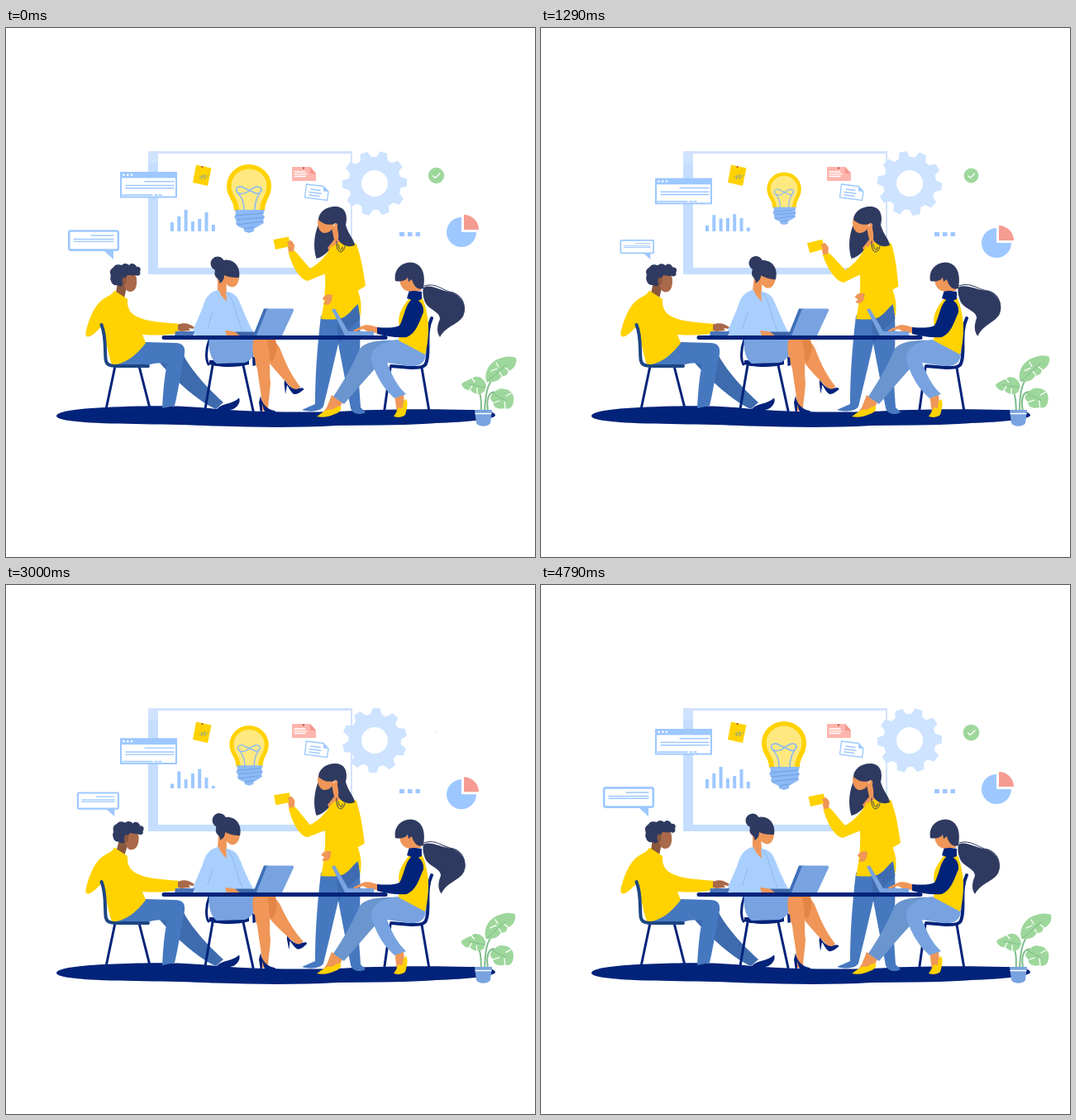
An HTML page for the animation above (4.87 s loop, 640 px wide and 640 px high).

```html
<!DOCTYPE html>
<html lang="en">
<head>
<meta charset="utf-8">
<title>Team meeting</title>
<style>
html, body { margin: 0; width: 100%; height: 100%; overflow: hidden; background: #fff; }
svg { display: block; width: 100vw; height: 100vh; }
.navy { fill: #02237a; } .yellow { fill: #ffd200; } .hair { fill: #2f3a60; }
.skin { fill: #ef9658; } .brown { fill: #a9694a; } .jeans { fill: #4678c0; }
.sky { fill: #78a3e0; } .pale { fill: #a9cffe; } .ice { fill: #9dc8ff; }
.leaf { fill: #9ed79c; } .white { fill: #fff; }
.line { fill: none; stroke-linecap: round; stroke-linejoin: round; }
.chair { stroke: #02237a; stroke-width: 3; }
.thin { stroke: #9dc8ff; stroke-width: 1.4; }
.cut { stroke: #fff; stroke-width: 1.3; }
</style>
</head>
<body>
<svg viewBox="0 0 640 640">
  <!-- board -->
  <path fill="#c5deff" d="M172 150h12v140h235v8H172z"/>
  <path fill="#d3e2fd" d="M172 149h247v114h-2V152H172z"/>
  <path fill="#cfe3ff" d="M172 151h12v12h-12z"/>
  <g id="bars" class="ice"></g>

  <g id="bulb">
    <path class="yellow" d="M276 221C276 208 267 205 267 191A27 26 0 0 1 321 191C321 205 313 208 313 221Z"/>
    <path fill="#ffe87f" d="M282 221C282 207 272.500 203 272.500 191A21.500 20.500 0 0 1 315.500 191C315.500 203 307 207 307 221Z"/>
    <path class="line" stroke="#8db9f5" stroke-width="1.6" d="M288 221C288 208 284 203 279 198C277 192 284 190 289 194L300 199C306 203 311 197 308 193C303 190 298 194 294 197C289 201 283 202 279 198M301 221C301 208 305 203 309 196"/>
    <path fill="#8db9f5" d="M277 220H313L311 226L313 228L311 233L312 236L305 240L300 243V246L294 248L288 246V243L281 240L278 237L279 232L276 229L278 225Z"/>
    <path class="line" stroke="#6f9fe3" d="M278 227L311 224M278 232L312 229M280 238L311 234M288 243L300 241"/>
  </g>

  <!-- notes -->
  <path class="yellow" d="M230 165.500L248.500 169.500L244 191L226 187Z"/>
  <path class="line" stroke="#9aa97c" d="M234 181L238 178L236 183L241 177L240 183L245 178"/>
  <circle cx="237.500" cy="168" r="1" fill="#a33"/>
  <path fill="#fdb5ad" d="M346 168H368L375 176V185H346Z"/>
  <path fill="#f7958c" d="M368 168L375 176H368Z"/>
  <circle cx="360" cy="169.500" r="1" fill="#a33"/>
  <path class="line" stroke="#fff" stroke-width="1.300" d="M349 174H362M349 176.800H364M349 179.500H362"/>
  <path class="thin white" d="M363.500 189L384 191.500L390 198L388.500 208.500L361.500 205Z"/>
  <path class="ice" d="M384 191.500L390 198L384 197.500Z"/>
  <path class="line thin" d="M369 195L380 196.500M367 198.500L381 200.300M367 202L379 203.500"/>

  <g id="win">
    <rect x="139" y="175" width="67" height="29.500" class="white" stroke="#9dc8ff" stroke-width="2"/>
    <path class="ice" d="M138 174h69v7.500h-69z"/>
    <g class="white"><circle cx="142.500" cy="177.700" r="1.300"/><circle cx="147.300" cy="177.700" r="1.300"/><circle cx="152" cy="177.700" r="1.300"/></g>
    <path class="line thin" d="M168 185.700H203M145 190.500H203M145 193.700H203M141 202H177M180 202H183M185 202H188"/>
  </g>

  <g id="gear" fill="#cde3ff"></g>
  <circle cx="446" cy="188" r="16" class="white"/>

  <g id="check">
    <circle cx="520.500" cy="178.500" r="9.800" class="leaf"/>
    <path class="line cut" d="M516.500 179L519.300 181.500L525 176"/>
  </g>
  <path class="ice" d="M476 247h6v5h-6zM486 247h5.500v5h-5.500zM495.500 247h5.500v5h-5.500z"/>
  <g id="pie">
    <path class="ice" d="M551 247V229A18 18 0 1 0 569 247Z"/>
    <path fill="#f59c92" d="M554 244V226A18 18 0 0 1 572 244Z"/>
  </g>
  <g id="bubble">
    <path class="ice" d="M118 269H130V280Z"/>
    <rect x="76.200" y="245.400" width="59.600" height="23.200" rx="2" class="white" stroke="#9dc8ff" stroke-width="2.600"/>
    <path class="line thin" d="M103 251H130M82 255.500H130M82 258.300H130"/>
  </g>

  <!-- floor -->
  <path class="navy" d="M61 469C64 462 100 459 160 457.500C220 456 240 460 270 462C320 465 360 465 400 464C450 461 500 460.500 560 462C585 462 592 465 592 469C588 474 560 476.500 520 478C480 481 440 480.500 400 481C350 484 300 483 250 481.500C200 479 130 479.500 95 477C72 475 61 473 61 469Z"/>

  <!-- man -->
  <path class="line chair" d="M132 409L121.500 459M161 409L173.500 458"/>
  <path fill="#3d6bad" d="M186 399L214 394C222 412 244 436 263 453L254 461C234 453 202 424 186 405Z"/>
  <path class="navy" d="M255 461C262 453 273 456 282 447.500C284 452 281 458 275 461C268 463 260 463 255 461Z"/>
  <path class="jeans" d="M128 407C145 398 155 381 170 380L205 381C214 381 217 386 216 394C212 415 208 440 204 457L189 460C190 442 191 424 195 406C180 403 172 409 160 409Z"/>
  <g id="manHead">
    <path fill="#8a583d" d="M136 300L147 308L143 327L133 321Z"/>
    <path class="brown" d="M143 300C150 294 158 296 158 304C159 313 156 319 150 319C144 319 141 310 143 300Z"/>
    <path class="hair" d="M127 306C125 302 128 300 126 297C125 291 130 291 131 288C135 285 138 287 140 287C143 284 147 285 149 287C152 283 157 286 158 289C162 288 164 292 162 295C164 299 159 301 157 299C153 300 149 299 147 299C144 302 145 307 142 310C140 313 137 313 135 311C131 312 128 310 127 306Z"/>
    <ellipse cx="143" cy="306" rx="2.500" ry="4.500" fill="#8a583d"/>
  </g>
  <path class="yellow" d="M131 317.500L147 328C146 340 152 346 158 349C170 355 185 356 210 358L208 369C195 372 180 372 165 371L169 381C160 393 145 408 128 407C124 395 122 385 120 372L116 361C108 368 104 374 98 373.500C95 371 97 366 98 362C102 348 108 336 115 330C121 325 128 324 131 317.500Z"/>
  <path class="line" stroke="#1d4683" stroke-width="4" d="M115.500 359C121 372 119.500 388 120.500 400C121 408 126 409 135 409H172"/>
  <path class="brown" d="M208 359C215 356 221 357 228 362L226 364L221 363L223 366L212 367L208 366Z"/>

  <!-- seated woman -->
  <path class="line chair" d="M246 377C241 390 242 402 245 407M250 408L241 461M287 408L299 463"/>
  <path class="navy" d="M246 402H294V407C280 411 260 411 246 407Z"/>
  <path class="sky" d="M246 372L308 376C304 388 299 403 288 405L255 406C247 401 244 386 246 372Z"/>
  <g id="calf">
    <path class="skin" d="M314 377C323 376 329 381 332 389C339 408 347 423 356 434L350 440C338 427 321 411 312 395Z"/>
    <path class="navy" d="M337 426C341 432 347 438 352 437C356 435 361 435 360 437.500C357 440 352 444 348 443C344 440 342 435 340 432L338 443L336.500 430Z"/>
  </g>
  <path fill="#e28545" d="M300 377H326C329 388 327 396 322 404L312 393Z"/>
  <path class="skin" d="M299 378H316C321 398 318 412 320 430C319 444 317 454 317 464L310 463C310 446 306 430 304 412C300 402 297 390 299 378Z"/>
  <path class="navy" d="M308 445C309 454 316 462 325 463C329 466 324 468 316 468C312 464 311 458 310 455V467H308L306 453Z"/>
  <path class="navy" d="M298 397L301 399L302 408L298.500 409Z"/>
  <g id="womanHead">
    <circle cx="256" cy="285" r="8.500" class="hair"/>
    <path class="skin" d="M256 300L266 304L267 320H256Z"/>
    <path class="skin" d="M261 296H281.500C283 305 280 313 274 313.500C267 313 262 306 261 296Z"/>
    <path class="hair" d="M252.500 298C252 287 258 280.500 267 280.500C278 281 284 291 282 302C275 302.500 268 301 264 299C264 305 261 308 258 309C260 304 253 303 252.500 298Z"/>
  </g>
  <path class="pale" d="M256 317C246 320 241 326 238 338L224 371L246 374L283 373L299 367C290 352 284 332 279 325C274 319 264 318 256 317Z"/>
  <path class="skin" d="M257 315L266 318L267 331C262 326 258 321 257 315Z"/>
  <path class="line" stroke="#8db9f2" d="M268 320C277 330 278 350 286 366M250 344L244 363"/>
  <path class="skin" d="M265 366C273 366 280 368 286 372H267Z"/>

  <!-- standing woman -->
  <path class="jeans" d="M381 348L426 334C431 360 427 400 427 430L429 459L435 465C428 469 419 467 417 460L405 398L402 382L392 425L384 458C380 464 368 465 358 462L374 455C374 425 376 390 381 348Z"/>
  <path fill="#3f6cb0" d="M400 350H410L426 334L428.500 352L414 366L402 382Z"/>
  <path class="hair" d="M384 228C374 240 370 262 375.500 279C384 277 393 269 398 257L396 240Z"/>
  <path class="skin" d="M394 242L402 236L404 260L393 273L389 266L397 256Z"/>
  <path class="skin" d="M377 234C378 227 394 225 397 235C397 243 391 249 384 248C379 246 377 241 377 234Z"/>
  <path class="yellow" d="M398 262L390 270C386 280 386 290 386 297C387 315 385 335 381 352C396 353 404 353 410 349C417 345 420 338 426 334L428.500 350C431 335 429 326 425 316L430 290L424 261L411 256Z"/>
  <g id="raised">
    <path class="yellow" d="M395 262C388 275 379 285 368 291C358 280 352 271 347 268L341.500 271C346 288 355 304 365 306C375 302 386 297 398 293Z"/>
    <path class="skin" d="M340 260C342 255 347 257 349 263L348 270L342 271Z"/>
    <path class="yellow" d="M323.500 256L342 252.500L344 264L326 268Z"/>
    <path class="skin" d="M340 259L345 257L347 263L343 266Z"/>
  </g>
  <g id="lowered">
    <path class="yellow" d="M412 262H424C430 278 433 298 435 312C420 322 404 329 394 333L391 325L412 311Z"/>
    <path class="skin" d="M395 323C389 321 384 324 383 328L387 330L384 334C389 336 393 334 394 330Z"/>
  </g>
  <path class="hair" d="M378 232C378 222 389 215 400 216C410 217 414 226 411 238C414 250 421 255 422 263C414 266 406 263 402 256C403 248 401 242 399 236C392 240 383 237 378 232Z"/>
  <path class="line" stroke="#2f3a60" stroke-width="1" d="M400 258C399 274 408 274 410 264M402 262C403 270 407 270 407 265"/>
  <path class="skin" d="M397 238C400 234 403 238 400 243Z"/>

  <!-- girl -->
  <path class="line chair" d="M465 411L458 461M503 411L511.500 461"/>
  <path class="line chair" style="stroke-width:4" d="M515 351C506 370 514 392 508 406C506 411 498 411 490 411L466 409"/>
  <path class="skin" d="M394 444L407 453L402 462L383 466L388 459ZM470 443L481 441L482 460L473 466Z"/>
  <path class="yellow" d="M376 470C384 465 388 460 393 462C397 462 401 456 405 458C406 462 404 465 398 467C391 470 384 472 376 470ZM469 470C473 464 474 462 475 459L480 460C480 455 481 450 484 449C487 454 485 461 483 468C478 472 472 471 469 470Z"/>
  <path fill="#6a95ce" d="M476 378C450 377 432 380 427 390C419 409 408 428 396 446L409 455C424 438 441 417 458 400Z"/>
  <path class="sky" d="M474 377L508 393C508 405 500 410 488 409L461 405C467 420 473 433 484 443L470 448C454 434 446 416 442 402C440 387 456 379 474 377Z"/>
  <path class="yellow" d="M488 327C478 339 473 349 476 361L475 378L507 395C511 380 512 362 510 350C508 338 506 330 502 325Z"/>
  <path class="navy" d="M488 317L503 319V328L496 331L485 327Z"/>
  <path class="navy" d="M490 329C500 326 506 335 505 344C499 358 496 369 485 374C472 375 460 373 449 370V362C460 363 470 363 476 360C482 350 482 337 490 329Z"/>
  <path class="skin" d="M449 362C441 359 435 358 430 361L420 366L421 368L432 364L439 368L449 369Z"/>
  <path class="skin" d="M476 303H503L502 318H492C489 319 477 320 476 303Z"/>
  <g id="tail">
    <path class="hair" d="M505 314C513 309 526 318 540 320C551 324 557 335 554 346C551 358 533 359 525 374C520 367 522 359 525 352C525 342 509 341 506 329C504 322 504 318 505 314Z"/>
    <path class="line" stroke="#2f3a60" d="M506 312C520 307 530 319 541 320C552 324 556 334 554 344"/>
  </g>
  <path class="hair" d="M471 306C469 294 476 284 490 283.500C504 285 508 298 505 315C498 318 493 312 491 304L487 307L486 302C482 307 476 307 471 306Z"/>

  <!-- table -->
  <path fill="#4b74b8" d="M205 367H228L226 373H204Z"/>
  <path fill="#3f66a8" d="M277 367.500H302V373H284Z"/>
  <path fill="#3d6fb8" d="M299 372L312 339.500H318L306 372Z"/>
  <path class="sky" d="M303 372L316 339.500H346Q349 340 348 342L334 372Z"/>
  <path class="sky" d="M394 340.500L398 339.500L414 367H445V372H410Z"/>
  <path class="line" stroke="#02237a" stroke-width="5" d="M191 374.500H459"/>

  <!-- plant -->
  <g id="plant">
    <path class="line" stroke="#7fbd8a" stroke-width="2" d="M579 464C580 440 582 425 604 408M575 464C574 450 578 440 562 430M583 464C580 442 588 434 602 447"/>
    <path class="leaf" d="M581 427C578 414 587 402 600 399C608 396 615 398 617 399C619 408 613 413 607 416C608 420 602 421 599 422C595 429 586 429 581 427Z"/>
    <path class="leaf" d="M581 433C580 426 574 421 567 422C563 425 554 427 551 431C553 436 557 439 562 438C566 444 576 444 579 439Z"/>
    <path class="leaf" d="M589 443C593 438 598 435 603 437C610 437 616 444 614 452C613 460 608 462 603 460C597 462 588 459 590 453C584 449 586 445 589 443Z"/>
    <path class="line cut" d="M587 415L594 412M593 405L596 410M600 421L597 416M609 415L604 411M564 424L567 428M561 438L564 433M570 442L570 436M604 460L603 452M611 442L605 445M591 453L597 451"/>
    <path class="line" stroke="#84c08b" d="M582 428L606 407M560 431L580 435M588 442L605 451"/>
  </g>
  <path class="sky" d="M567 462H588L586 478C583 483 572 483 569 478Z"/>
  <path class="line cut" d="M568 466.500H587"/>
</svg>
<script>
const LOOP = 4870, STEP = LOOP / 68, LEAD = 50, NS = "http://www.w3.org/2000/svg";
const el = id => document.getElementById(id);
const add = (parent, tag, attrs) => {
  const node = document.createElementNS(NS, tag);
  for (const k in attrs) node.setAttribute(k, attrs[k]);
  return parent.appendChild(node);
};
const move = (id, value) => el(id).setAttribute("transform", value);
const turn = (id, a, x, y) => move(id, `rotate(${a} ${x} ${y})`);
const grow = (id, s, x, y) => move(id, `translate(${x} ${y}) scale(${s}) translate(${-x} ${-y})`);
const wave = (t, n) => Math.cos(2 * Math.PI * n * (t + LEAD) / LOOP);

// eased value from [time, value] pairs
function track(keys, t) {
  const i = keys.findIndex(k => k[0] > t);
  const [t0, a] = keys[i - 1], [t1, b] = keys[i];
  return a + (b - a) * (1 - Math.cos(Math.PI * (t - t0) / (t1 - t0))) / 2;
}
const nod = [[0, 0], [600, 5], [1200, 2], [1900, 5], [3000, 6.5], [3800, 12.5], [4780, 0], [LOOP, 0]];
const lift = [[0, 0], [500, 2.6], [1290, -3.2], [1790, -1], [3000, 1.3], [3790, 7], [4780, 0], [LOOP, 0]];

add(el("gear"), "circle", { cx: 446, cy: 188, r: 32 });
for (let i = 0; i < 10; i++)
  add(el("gear"), "path", { d: "M438 160L441.500 149H450.500L454 160Z", transform: `rotate(${i * 36} 446 188)` });

const tops = [[235, 241.5], [228, 225], [220, 238], [234, 227], [231, 221], [223, 235], [238, 244]];
const bars = tops.map((_, i) => add(el("bars"), "rect", { x: 199 + i * 8.3, width: 4 }));

function draw(t) {
  const slow = (1 - wave(t, 1)) / 2, mid = wave(t, 2), fast = wave(t, 4);
  const sway = t < 3800 ? (1 - Math.cos(2 * Math.PI * t / 3800)) / 2 : 0;

  bars.forEach((bar, i) => {
    const y = tops[i][0] + (tops[i][1] - tops[i][0]) * slow;
    bar.setAttribute("y", y);
    bar.setAttribute("height", 246 - y);
  });
  move("win", `translate(0 ${13.5 * slow})`);
  move("pie", `translate(0 ${17 * sway})`);
  grow("bubble", .83 + .17 * mid, 137, 280);
  grow("bulb", .88 + .12 * mid, 294.3, 206);
  grow("check", .53 + .47 * fast, 520.5, 178.5);
  turn("gear", 2.5 - 22.5 * mid, 446, 188);
  turn("plant", (mid - 1) * 1.1, 577, 464);
  turn("womanHead", (1 - mid) * 3.5, 263, 318);
  turn("calf", (fast - 1) * 2.2, 318, 385);
  turn("manHead", track(nod, t), 139, 328);
  turn("raised", track(lift, t), 400, 285);
  turn("lowered", 4 * sway, 418, 265);
  turn("tail", -4.5 * sway, 507, 316);
}

// steps begin up to 10 ms early, since delays are whole hundredths
function frame(now) {
  draw(Math.floor((now + 10) % LOOP / STEP) * STEP);
  requestAnimationFrame(frame);
}
draw(0);
requestAnimationFrame(frame);
</script>
</body>
</html>
```
